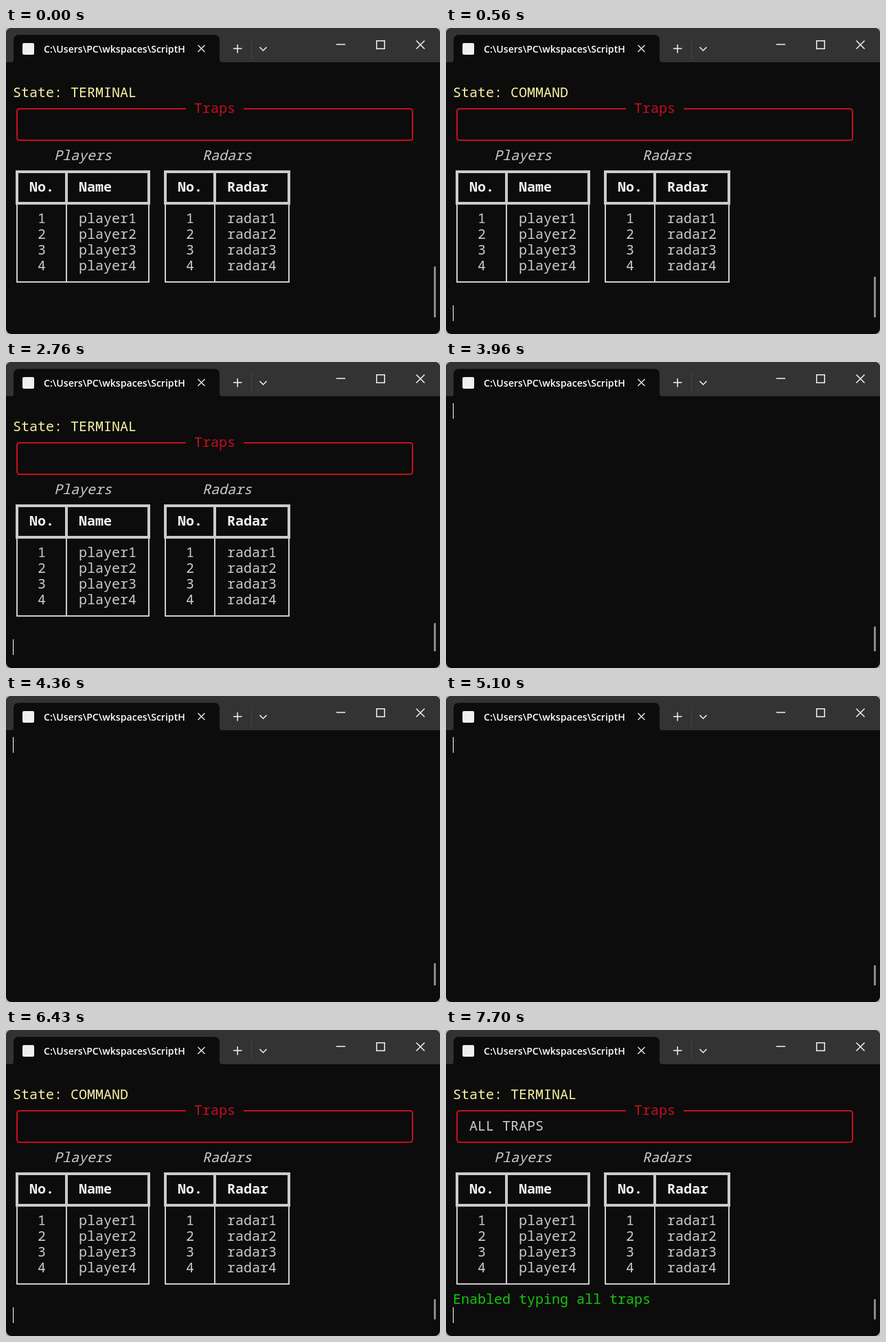
Animation, 632 px wide and 447 px high, one loop 8 s. Source, as an HTML page:

```html
<!DOCTYPE html>
<html lang="en">
<head>
<meta charset="utf-8">
<title>Terminal</title>
<style>
  html, body { margin: 0; width: 100%; height: 100%; overflow: hidden; background: #b4b4b4; }
  svg { display: block; }
  .mono { font: 500 20px "Noto Sans Mono", "DejaVu Sans Mono", monospace; fill: #ccc; white-space: pre; }
  .mono .head { font-weight: 600; fill: #f2f2f2; }
  .mono .title { font-style: italic; }
  .mono .state { fill: #f9f1a5; }
  .mono .red { fill: #c50f1f; }
  .mono .green { fill: #16c60c; }
  .tab { font: 600 14.1px "Open Sans", "Noto Sans", sans-serif; fill: #fff; }
  .line { fill: none; stroke: #ccc; stroke-width: 2; }
  .thick { stroke-width: 4; }
  .glyph { fill: none; stroke: #f4f4f4; stroke-width: 1.5; }
</style>
</head>
<body>
<svg width="632" height="447" viewBox="0 0 632 447">
  <defs>
    <clipPath id="tabClip"><rect x="50" y="14" width="210" height="34"/></clipPath>
    <clipPath id="winClip"><rect width="632" height="447" rx="8"/></clipPath>
  </defs>
  <g clip-path="url(#winClip)">
    <rect width="632" height="447" fill="#0c0c0c"/>
    <rect width="632" height="50" fill="#333"/>
    <path fill="#0c0c0c" d="M7 50q4 0 4-4V18q0-8 8-8H303q8 0 8 8V46q0 4 4 4z"/>
  </g>
  <rect x="24" y="22" width="17" height="17" rx="2" fill="#f0f0f0"/>
  <text class="tab" x="55" y="36" clip-path="url(#tabClip)">C:\Users\PC\wkspaces\ScriptH</text>
  <path d="M357.5 15V45" stroke="#434343"/>
  <g class="glyph">
    <path stroke-width="1.3" d="M279.5 25l10 10M289.5 25l-10 10"/>
    <path d="M331 30h12.5M337.2 24v12.5M369.5 28l5 5 5-5"/>
    <path d="M481 24h13M597.5 18.5l12 12M609.5 18.5l-12 12"/>
    <rect x="539.7" y="18.7" width="11.6" height="11.6"/>
  </g>

  <g id="screen" class="mono"></g>
  <rect id="cursor" x="10" width="1" height="23" fill="#fff"/>
  <rect id="bar" x="623" width="3" rx="1.5" fill="#8b8b8b"/>
</svg>
<script>
const LOOP = 8000, CELL = 12, ROW = 23, LEFT = 10, TOP = 60, BAR_END = 423;
const $ = id => document.getElementById(id);

const text = (col, row, str, cls = "", id = "") =>
  `<text x="${LEFT + col * CELL}" y="${TOP + row * ROW + 18}" class="${cls}" id="${id}">${str}</text>`;

function table(col, title, titleCol, head, item, right) {
  const x = LEFT + col * CELL + 6, mid = x + 72;
  let out = text(titleCol, 5, title, "title")
    + text(col + 2, 7, "No.", "head") + text(col + 8, 7, head, "head")
    + `<path class="line" d="M${x} 256V371H${right}V256M${mid} 256V371"/>`
    + `<path class="line thick" d="M${x} 210H${right}V256H${x}zM${mid} 210V256"/>`;
  for (let i = 1; i <= 4; i++) out += text(col + 3, 8 + i, i) + text(col + 8, 8 + i, item + i);
  return out;
}

$("screen").innerHTML =
  text(0, 1, "State:", "state") + text(7, 1, "", "state", "state")
  + `<path class="line" style="stroke:#c50f1f" d="M262 118H20q-4 0-4 4V160q0 4 4 4H588q4 0 4-4V122q0-4-4-4H346"/>`
  + text(22, 2, "Traps", "red") + text(2, 3, "ALL TRAPS", "", "traps")
  + table(0, "Players", 5, "Name", "player", 208)
  + table(18, "Radars", 23, "Radar", "radar", 412)
  + text(0, 14, "Enabled typing all traps", "green", "message");

// [start ms, state word (null = cleared screen), top of the scroll bar]
const steps = [
  [0, "TERMINAL", 348],
  [500, null, 348], [560, "COMMAND", 363],
  [1230, null, 363], [1300, "TRANSMIT_TEXT", 374],
  [2760, "TERMINAL", 381],
  [3500, null, 381], [3560, "COMMAND", 386],
  [3960, null, 386], [4030, "COMMAND", 390],
  [4360, null, 390], [4430, "COMMAND", 393],
  [4760, "TERMINAL", 393],
  [5100, null, 393], [5160, "COMMAND", 393],
  [5360, null, 393], [5430, "COMMAND", 393],
  [5900, null, 393], [5960, "COMMAND", 393],
  [6100, "TERMINAL", 393],
  [6360, null, 393], [6430, "COMMAND", 393],
  [7630, null, 393], [7700, "TERMINAL", 393]
];

const show = (el, on) => el.setAttribute("visibility", on ? "inherit" : "hidden");
let current = -1;

function draw(now) {
  const t = now % LOOP;
  const index = steps.findLastIndex(s => s[0] <= t);
  if (index === current) return;
  current = index;
  const [start, word, barTop] = steps[index];
  const done = start >= 7700;
  show($("screen"), word !== null);
  $("state").textContent = word || "";
  show($("traps"), done);
  show($("message"), done);
  show($("cursor"), start > 0);
  $("cursor").setAttribute("y", word === null ? TOP : TOP + 15 * ROW);
  $("bar").setAttribute("y", barTop);
  $("bar").setAttribute("height", BAR_END - barTop);
}

const begin = performance.now();
function tick() {
  draw(performance.now() - begin);
  requestAnimationFrame(tick);
}
tick();
</script>
</body>
</html>
```
